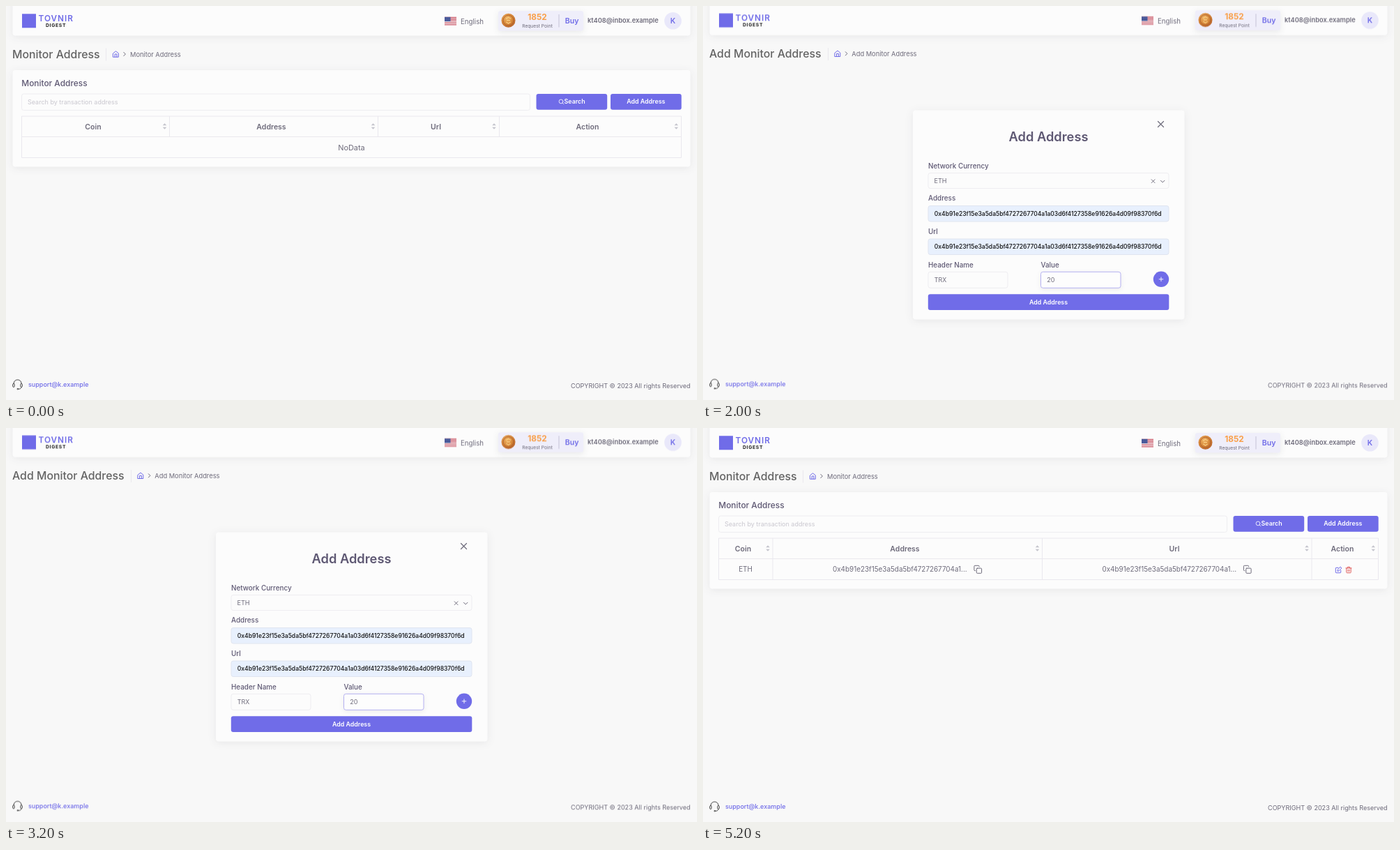
Write an HTML page that moves like this. It is 991 by 565 pixels and loops after 6 s.

```html
<!DOCTYPE html>
<html lang="en">
<head>
<meta charset="utf-8">
<title>Monitor Address</title>
<style>
  html, body { margin: 0; width: 100%; height: 100%; overflow: hidden; background: #f8f8f8; }
  svg { display: block; width: 991px; height: 565px; }
  text { font-family: Inter, "Open Sans", sans-serif; font-size: 9.3px; fill: #6e6b7b; white-space: pre; }
  .mid { text-anchor: middle; }
  .end { text-anchor: end; }
  .bold { font-weight: 600; }
  .purple { fill: #706ce8; }
  .title { font-size: 15.85px; font-weight: 500; fill: #636363; }
  .heading { font-size: 11.9px; font-weight: 500; fill: #5e5873; }
  .big { font-size: 18.3px; font-weight: 600; fill: #5e5873; }
  .label { font-size: 9.9px; font-weight: 500; fill: #5e5873; }
  .th { font-size: 10.5px; font-weight: 600; text-anchor: middle; }
  .td { font-size: 9.88px; }
  .btn { font-size: 8.85px; font-weight: 600; fill: #fff; }
  .hash { font-size: 8.55px; font-weight: 500; fill: #111; }
  .card { fill: #fcfcfc; filter: drop-shadow(0 2.5px 6px rgba(34, 41, 47, .08)); }
  .box { fill: #fcfcfc; stroke: #eeedf1; }
  .auto { fill: #e8f0fd; stroke: #e0e5f0; }
  .focus { fill: #fdfdfd; stroke: #b5b1f1; filter: drop-shadow(0 2px 3px rgba(34, 41, 47, .08)); }
  .rule { fill: none; stroke: #eae8ee; }
  .icon { fill: none; stroke: #6e6b7b; stroke-width: 1; stroke-linecap: round; stroke-linejoin: round; }
  .icon.p { stroke: #706ce8; }
  .icon.w { stroke: #fff; }
  .icon.r { stroke: #e0605e; }

  .page, .list, .form, .empty, .filled { animation: 6s step-end infinite; }
  .page { animation-name: nudge; }
  .list { animation-name: list; }
  .form { animation-name: form; }
  .empty { animation-name: empty; }
  .filled { animation-name: filled; }
  @keyframes nudge { 0% { transform: none; } 33.333% { transform: translateY(-.7px); } 66.666%, 100% { transform: none; } }
  @keyframes list { 0% { opacity: 1; } 33.333% { opacity: 0; } 66.666%, 100% { opacity: 1; } }
  @keyframes form { 0% { opacity: 0; } 33.333% { opacity: 1; } 66.666%, 100% { opacity: 0; } }
  @keyframes empty { 0% { opacity: 1; } 33.333%, 100% { opacity: 0; } }
  @keyframes filled { 0% { opacity: 0; } 66.666%, 100% { opacity: 1; } }
</style>
</head>
<body>
<svg viewBox="0 0 991 565">
  <defs>
    <radialGradient id="gold" cx=".4" cy=".35" r=".7">
      <stop offset="0" stop-color="#f0b465"/>
      <stop offset=".6" stop-color="#d58638"/>
      <stop offset="1" stop-color="#b5602a"/>
    </radialGradient>
    <!-- icons are centred on 0,0 -->
    <path id="home" d="M-3.8-1.2L0-4.2 3.8-1.2V4.2H-3.8zM-1.4 4V0H1.4V4"/>
    <path id="next" d="M-1.2-2.6L1.4 0-1.2 2.6"/>
    <path id="sort" fill="#c4c4cc" d="M-2.8-1.2L0-4.2 2.8-1.2zM-2.8 1.2L0 4.2 2.8 1.2z"/>
    <path id="copy" d="M-1-1.7H4.3a1 1 0 0 1 1 1V4.5a1 1 0 0 1-1 1H-1a1 1 0 0 1-1-1V-.7a1 1 0 0 1 1-1zM-3.8 1.8H-4.4a1 1 0 0 1-1-1V-4.5a1 1 0 0 1 1-1H.8a1 1 0 0 1 1 1V-3.8"/>
    <path id="edit" d="M-.5-3.2H-3.4a.8.8 0 0 0-.8.8V3.4a.8.8 0 0 0 .8.8H2.4a.8.8 0 0 0 .8-.8V.6M2.8-4.2L4.4-2.6 .4 1.4-1.6 1.9-1.1-.2z"/>
    <path id="trash" d="M-4-2.6H4M-3.2-2.6V3.4a.8.8 0 0 0 .8.8H2.4a.8.8 0 0 0 .8-.8V-2.6M-1.5-2.6V-4.2H1.5V-2.6M-1-.4V2.2M1-.4V2.2"/>
    <path id="cross" d="M-1-1L1 1M1-1L-1 1"/>
  </defs>
  <rect width="991" height="565" fill="#f8f8f8"/>

  <g class="page">
    <rect class="card" x="9.5" y="-10" width="972" height="52.5" rx="4"/>
    <rect class="purple" x="23" y="11.3" width="20" height="20"/>
    <text class="bold purple" x="46.5" y="22.1" style="font-size:11.8px;letter-spacing:1px">TOVNIR</text>
    <text x="57" y="30.3" style="font-size:6.8px;font-weight:700;letter-spacing:.7px;fill:#222">DIGEST</text>

    <rect x="629" y="15.8" width="17" height="11.6" fill="#f3eef0"/>
    <path d="M637.5 15.8V27.4" stroke="#cb5060" stroke-width="17" stroke-dasharray=".892"/>
    <rect x="629" y="15.8" width="8.5" height="6.3" fill="#4a5a9a"/>
    <text x="652" y="25.5" style="font-size:9.7px">English</text>

    <rect x="706" y="7" width="122" height="28.5" rx="3" fill="#efeefa" style="filter:drop-shadow(0 2px 4px rgba(34,41,47,.09))"/>
    <circle cx="720.5" cy="20.7" r="10" fill="url(#gold)"/>
    <circle cx="720.5" cy="20.7" r="7.4" fill="none" stroke="#a8592c" stroke-width=".8"/>
    <path d="M717 18.3l3.5-2 3.5 2M717.3 23l3.2 2 3.2-2M718 20.6h5" fill="none" stroke="#f9cf86" stroke-width="1.2"/>
    <text class="mid" x="762" y="20" style="font-size:11.8px;font-weight:700;fill:#f9a04a">1852</text>
    <text class="mid" x="762" y="31.2" style="font-size:6.7px">Request Point</text>
    <path d="M793 12V30.5" stroke="#c5c2d6"/>
    <text class="bold purple" x="801.7" y="24.9" style="font-size:10.6px">Buy</text>
    <text class="bold" x="834" y="24.4">kt408@inbox.example</text>
    <circle cx="956.5" cy="21.2" r="12.3" fill="#e9e8fa"/>
    <text class="bold purple mid" x="956.5" y="25" style="font-size:10.5px">K</text>

    <g class="icon" style="stroke:#444">
      <path d="M11.2 541.5V541a5.4 5 0 0 1 10.8 0V541.5M22 546.5c0 2-1.6 2.8-4 2.8"/>
      <rect x="9.7" y="541.5" width="2.4" height="5" rx="1.2"/>
      <rect x="20.9" y="541.5" width="2.4" height="5" rx="1.2"/>
      <circle cx="16.8" cy="549.2" r=".8"/>
    </g>
    <text class="purple" x="32" y="545.8" style="font-size:9px;font-weight:500">support@k.example</text>
    <text class="end" x="981.5" y="547.9" style="font-size:9.05px">COPYRIGHT © 2023 All rights Reserved</text>
  </g>

  <g class="list">
    <text class="title" x="9" y="75">Monitor Address</text>
    <path class="rule" d="M143.5 60.5V78.5"/>
    <use href="#home" class="icon p" x="157.5" y="69"/>
    <use href="#next" class="icon" x="170" y="69"/>
    <text x="178" y="72.5">Monitor Address</text>

    <rect class="card" x="9.5" y="92" width="972" height="138.5" rx="4"/>
    <text class="heading" x="22.3" y="115.1">Monitor Address</text>
    <rect class="box" x="22.5" y="126" width="729" height="23.5" rx="3"/>
    <text x="31" y="141" style="font-size:9px;fill:#c9c7cf">Search by transaction address</text>
    <rect class="purple" x="760.5" y="126" width="101.7" height="22.8" rx="3"/>
    <rect class="purple" x="867" y="126" width="101.7" height="22.8" rx="3"/>
    <path class="icon w" style="stroke-width:.8" d="M798.9 136.9a2.9 2.9 0 1 1-5.8 0a2.9 2.9 0 1 1 5.8 0M798.2 139.1L799.9 140.7"/>
    <text class="btn" x="800.6" y="140.4">Search</text>
    <text class="btn mid" x="917.8" y="140.4">Add Address</text>
    <path class="rule" d="M22.5 158H968.5V217.5H22.5zM22.5 187.5H968.5"/>
    <use href="#sort" x="961.3" y="172.5"/>

    <g class="empty">
      <path class="rule" d="M234.5 158V187.5M533.5 158V187.5M707.5 158V187.5"/>
      <text class="th" x="125" y="176.9">Coin</text>
      <text class="th" x="380.5" y="176.9">Address</text>
      <text class="th" x="616.5" y="176.9">Url</text>
      <text class="th" x="834" y="176.9">Action</text>
      <use href="#sort" x="227.5" y="172.5"/>
      <use href="#sort" x="526.5" y="172.5"/>
      <use href="#sort" x="700" y="172.5"/>
      <text class="mid" x="495.5" y="206.5" style="font-size:10.9px">NoData</text>
    </g>

    <g class="filled">
      <path class="rule" d="M100 158V217.5M486.5 158V217.5M873 158V217.5"/>
      <text class="th" x="57.5" y="176.9">Coin</text>
      <text class="th" x="289.5" y="176.9">Address</text>
      <text class="th" x="676" y="176.9">Url</text>
      <text class="th" x="917" y="176.9">Action</text>
      <use href="#sort" x="93" y="172.5"/>
      <use href="#sort" x="479.5" y="172.5"/>
      <use href="#sort" x="866" y="172.5"/>
      <text class="td mid" x="61" y="206.3">ETH</text>
      <text class="td" x="186" y="206.3">0x4b91e23f15e3a5da5bf4727267704a1...</text>
      <use href="#copy" class="icon" x="394.3" y="202.8"/>
      <text class="td" x="572.5" y="206.3">0x4b91e23f15e3a5da5bf4727267704a1...</text>
      <use href="#copy" class="icon" x="780.8" y="202.8"/>
      <use href="#edit" class="icon p" x="911.5" y="203.5"/>
      <use href="#trash" class="icon r" x="926" y="203.5"/>
    </g>
  </g>

  <g class="form">
    <text class="title" x="9" y="74.3">Add Monitor Address</text>
    <path class="rule" d="M179.5 60V78"/>
    <use href="#home" class="icon p" x="193" y="68.3"/>
    <use href="#next" class="icon" x="205.5" y="68.3"/>
    <text x="213.3" y="71.8">Add Monitor Address</text>

    <rect class="card" x="301" y="149.5" width="389.5" height="300" rx="4"/>
    <use href="#cross" class="icon" style="stroke-width:.3" transform="translate(656.5 169.5) scale(4)"/>
    <text class="big mid" x="495.5" y="194.3">Add Address</text>

    <text class="label" x="323" y="233">Network Currency</text>
    <rect class="box" x="323" y="239.5" width="345" height="22" rx="3"/>
    <text x="331.5" y="254.3" style="font-size:9.1px">ETH</text>
    <use href="#cross" class="icon" style="stroke-width:.4" transform="translate(645.6 251.2) scale(2.4)"/>
    <path class="icon" d="M656.4 250.2L659.2 253 662 250.2"/>

    <text class="label" x="323" y="279.3">Address</text>
    <rect class="auto" x="323" y="286.5" width="345" height="22.5" rx="3"/>
    <text class="hash" x="331.8" y="300.7">0x4b91e23f15e3a5da5bf4727267704a1a03d6f4127358e91626a4d09f98370f6d</text>

    <text class="label" x="323" y="326.8">Url</text>
    <rect class="auto" x="323" y="334" width="345" height="22.5" rx="3"/>
    <text class="hash" x="331.8" y="348.2">0x4b91e23f15e3a5da5bf4727267704a1a03d6f4127358e91626a4d09f98370f6d</text>

    <text class="label" x="323" y="374.6">Header Name</text>
    <rect class="box" x="323" y="381.3" width="114" height="23" rx="3"/>
    <text x="331.8" y="396.1" style="font-size:8.8px">TRX</text>
    <text class="label" x="484.5" y="374.6">Value</text>
    <rect class="focus" x="484.5" y="381.3" width="114.5" height="23" rx="3"/>
    <text x="493.2" y="396.1" style="font-size:9px">20</text>
    <circle class="purple" cx="657" cy="391.8" r="11.2"/>
    <path class="icon w" style="stroke-width:.9" d="M654.2 391.8H659.8M657 389V394.6"/>

    <rect class="purple" x="322.8" y="413.2" width="345.5" height="22.9" rx="3"/>
    <text class="btn mid" x="495.5" y="427.9">Add Address</text>
  </g>
</svg>
</body>
</html>
```
